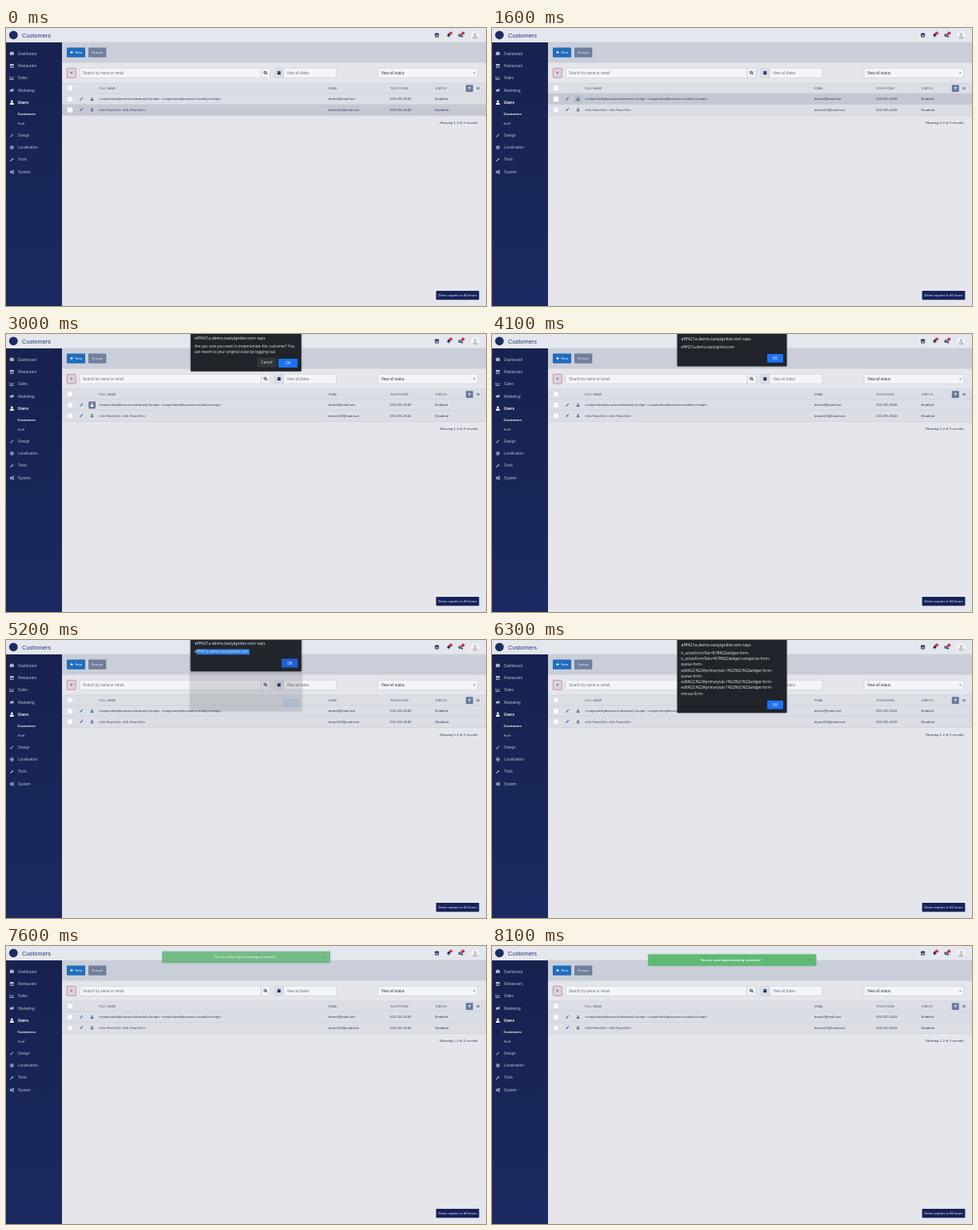
An HTML page with a canvas for the animation above (8200 ms loop, 600 by 348 pixels).

```html
<!DOCTYPE html>
<html lang="en">
<head>
<meta charset="utf-8">
<title>Customers</title>
<style>
html, body { margin: 0; width: 100%; height: 100%; overflow: hidden; background: #e4e6ec; }
canvas { display: block; width: 600px; height: 348px; }
</style>
</head>
<body>
<canvas id="stage"></canvas>
<script>
const LOOP = 8200, STEP = 100, W = 600, H = 348;
const canvas = document.getElementById('stage');
const ctx = canvas.getContext('2d');
const dpr = window.devicePixelRatio || 1;
canvas.width = W * dpr;
canvas.height = H * dpr;

const SANS = '"Liberation Sans", Arial, sans-serif';
const NOTO = '"Noto Sans", "Open Sans", sans-serif';
const NAVY = '#1b2858', INK = '#2b3350', MUTED = '#6d7486';

// Icons on a 16 unit grid
const ICONS = {
  gauge: 'M2 14A8 8 0 1 1 14 14ZM7 11L11 5 9.5 12Z',
  store: 'M2 1H14L16 7H0ZM1.5 8H14.5V15H1.5ZM4 9V12H12V9Z',
  chart: 'M0 1H2V13H16V15H0ZM4 9L7 5 10 8 15 3V6L10 11 7 8 4 12Z',
  horn: 'M1 5H6L14 1V13L6 10H5L6 15H3L2 10H1Z',
  user: 'M8 0A4 4 0 1 1 8 8A4 4 0 1 1 8 0ZM1 16V13Q1 9 5 9H11Q15 9 15 13V16Z',
  brush: 'M15 1L9 10 6 8ZM5 9L8 11Q7 15 1 15Q3 13 3 11Z',
  globe: 'M8 1A7 7 0 1 1 8 15A7 7 0 1 1 8 1ZM7 3V7H3Q4 4 7 3ZM9 3V7H13Q12 4 9 3ZM7 13V9H3Q4 12 7 13ZM9 13V9H13Q12 12 9 13Z',
  wrench: 'M1 13L8 6Q7 1 12 1L10 4 12 6 15 4Q15 9 10 8L3 15Z',
  cogs: 'M5.5 3A5 5 0 1 1 5.5 13A5 5 0 1 1 5.5 3ZM5.5 6A2 2 0 1 0 5.5 10A2 2 0 1 0 5.5 6ZM13 1A3 3 0 1 1 13 7A3 3 0 1 1 13 1ZM13 9A3 3 0 1 1 13 15A3 3 0 1 1 13 9Z',
  bell: 'M8 0Q13 2 13 8L15 12H1L3 8Q3 2 8 0ZM6 13H10Q10 16 8 16Q6 16 6 13Z',
  search: 'M6.5 0A6.5 6.5 0 1 1 6.5 13A6.5 6.5 0 1 1 6.5 0ZM6.5 3A3.5 3.5 0 1 0 6.5 10A3.5 3.5 0 1 0 6.5 3ZM10 12L12 10 16 14 14 16Z',
  calendar: 'M1 2H4V0H6V2H10V0H12V2H15V5H1ZM1 6H15V16H1Z',
  pencil: 'M1 15L2 11 10 3 13 6 5 14ZM11 2L13 0 16 3 14 5Z',
  filter: 'M1 1H15L10 8V15L6 12V8Z',
  plus: 'M6 1H10V6H15V10H10V15H6V10H1V6H6Z',
  cross: 'M3 1L8 6 13 1 15 3 10 8 15 13 13 15 8 10 3 15 1 13 6 8 1 3Z',
  caret: 'M1 5H15L8 13Z',
  list: 'M0 2H16V4H0ZM0 7H16V9H0ZM0 12H16V14H0Z'
};
for (const k in ICONS) ICONS[k] = new Path2D(ICONS[k]);

function icon(name, x, y, size, color) {
  ctx.save();
  ctx.translate(x - size / 2, y - size / 2);
  ctx.scale(size / 16, size / 16);
  ctx.fillStyle = color;
  ctx.fill(ICONS[name], 'evenodd');
  ctx.restore();
}

// Text is set ten times larger and scaled down for exact advances
function text(str, x, y, size, color, o = {}) {
  ctx.save();
  ctx.translate(x, y + size * 0.34);
  ctx.scale(0.1, 0.1);
  ctx.font = (o.bold ? 'bold ' : '') + size * 10 + 'px ' + (o.font || SANS);
  ctx.textAlign = o.align || 'left';
  ctx.fillStyle = color;
  ctx.fillText(str, 0, 0);
  ctx.restore();
}

function box(x, y, w, h, fill, r = 0, stroke) {
  ctx.beginPath();
  ctx.roundRect(x, y, w, h, r);
  ctx.fillStyle = fill;
  ctx.fill();
  if (stroke) {
    ctx.strokeStyle = stroke;
    ctx.lineWidth = 0.6;
    ctx.stroke();
  }
}

function disc(x, y, r, fill) {
  ctx.beginPath();
  ctx.arc(x, y, r, 0, 7);
  ctx.fillStyle = fill;
  ctx.fill();
}

// Linear interpolation through [time, value, ...] keys
function track(keys, t) {
  if (t <= keys[0][0]) return keys[0].slice(1);
  for (let i = 1; i < keys.length; i++) {
    const a = keys[i - 1], b = keys[i];
    if (t <= b[0]) {
      const p = (t - a[0]) / (b[0] - a[0]);
      return a.slice(1).map((v, j) => v + (b[j + 1] - v) * p);
    }
  }
  return keys[keys.length - 1].slice(1);
}

const MENU = [
  ['gauge', 'Dashboard', 32], ['store', 'Restaurant', 47.4], ['chart', 'Sales', 62.6],
  ['horn', 'Marketing', 78], ['user', 'Users', 93.2], ['brush', 'Design', 134.2],
  ['globe', 'Localisation', 149.6], ['wrench', 'Tools', 164.9], ['cogs', 'System', 180.2]
];

function sidebar() {
  const g = ctx.createLinearGradient(0, 18, 0, H);
  g.addColorStop(0, '#17224f');
  g.addColorStop(1, '#1a2960');
  box(0, 18, 70, H - 18, g);
  for (const [name, label, y] of MENU) {
    const on = label === 'Users';
    const color = on ? '#ffffff' : '#b9c0d4';
    icon(name, 7.3, y, 5.4, color);
    text(label, 15, y, 4.7, color, { bold: on });
  }
  text('Customers', 14.5, 107.2, 4.3, '#ffffff', { bold: true });
  text('Staff', 14.5, 120, 4.3, '#b9c0d4');
}

function header() {
  box(0, 0, W, 18, '#e5e7ee');
  box(70, 17.7, 530, 0.6, '#b9bdca');
  disc(9.3, 8.8, 5.4, '#1d2b63');
  text('Customers', 20, 9.2, 7.45, '#24356f');
  icon('store', 538.6, 9, 5.6, NAVY);
  icon('bell', 553.4, 9, 5.2, NAVY);
  icon('cogs', 568.2, 9, 6, NAVY);
  disc(556, 6.5, 2.1, '#d8363e');
  disc(571.3, 6.5, 2.1, '#d8363e');
  disc(586.4, 9.2, 5, '#f6f5f7');
  ctx.save();
  ctx.beginPath();
  ctx.arc(586.4, 9.2, 4.8, 0, 7);
  ctx.clip();
  disc(586.4, 8, 2, '#c9c3c8');
  disc(586.4, 14, 4, '#c9c3c8');
  ctx.restore();
}

function toolbar() {
  box(70, 18.2, 530, 25.3, '#caced8');
  box(76, 24.5, 23, 12.3, '#1f6dbd', 0.8);
  icon('plus', 82, 30.5, 4, '#ffffff');
  text('New', 86.5, 30.5, 4.28, '#ffffff');
  box(103, 24.5, 22.3, 12.3, '#717f9d', 0.8);
  text('Groups', 107, 30.5, 4.28, '#eef0f5');
}

function filters() {
  const edge = '#c6cad5';
  box(76.4, 50.4, 10.8, 11.8, '#d4d8e2', 0.8, '#d4555d');
  icon('cross', 81.8, 56, 3.2, '#d42f3a');
  box(92.3, 50.3, 226.5, 12, '#f4f5f8', 0.8, edge);
  text('Search by name or email', 96, 56.3, 4.6, MUTED);
  box(318.8, 50.3, 11.4, 12, '#f1f2f6', 0.8, edge);
  icon('search', 324.4, 56, 4.6, NAVY);
  box(336, 50.3, 11, 12, '#dcdfe7', 0.8, edge);
  icon('calendar', 341.3, 56, 4.6, NAVY);
  box(347, 50.3, 66, 12, '#f4f5f8', 0.8, edge);
  text('View all dates', 351, 56.3, 4.55, MUTED);
  box(465, 50.3, 124.7, 12, '#f4f5f8', 0.8, edge);
  text('View all status', 469, 56, 4.55, INK);
  icon('caret', 585.3, 56.3, 2.6, NAVY);
}

const ROWS = [
  ['<script>alert(document.domain)<\/script> <script>alert(document.cookie)<\/script>',
    'demo2@mail.test', '555-555-0142', 'Enabled', 82, 89],
  ['<h1>Test</h1> <h1>Test</h1>', 'demo123@mail.test', '555-555-0142', 'Disabled', 96, 102.4]
];

function checkbox(y) {
  box(76.6, y - 3.4, 6.8, 6.8, '#fafafc', 0.8, '#c9cdd8');
}

function table(hover, press) {
  box(70, 69, 530, 13, '#dcdee6');
  checkbox(75.2);
  [['FULL NAME', 116], ['EMAIL', 403], ['TELEPHONE', 480], ['STATUS', 536.5]]
    .forEach(([s, x]) => text(s, x, 75.6, 3.8, '#555d72'));
  box(574.8, 71.2, 9, 8.8, '#6a7b9e', 0.8);
  icon('filter', 579.3, 75.6, 3.8, '#ffffff');
  icon('list', 590, 75.4, 3.8, '#4b556f');

  ROWS.forEach(([name, mail, phone, status, top, y], i) => {
    box(70, top, 530, 13.6, '#dcdee6');
    ctx.globalAlpha = hover[i];
    box(70, top, 530, 13.6, '#c4c8d3');
    ctx.globalAlpha = 1;
    checkbox(y);
    icon('pencil', 94.2, y - 0.2, 4.4, '#1f6dbd');
    if (i === 0 && press > 0) {
      ctx.globalAlpha = press;
      box(103.2, y - 4.6, 8.8, 9, '#687a9f', 0.8);
      ctx.globalAlpha = 1;
    }
    icon('user', 107.5, y - 0.2, 4.2, i === 0 && press > 0.5 ? '#ffffff' : '#5c6b8f');
    text(name, 116, y, 4.28, INK);
    text(mail, 403, y, 4.28, INK);
    text(phone, 480, y, 4.28, INK);
    text(status, 536.5, y, 4.28, INK);
  });
  [69, 82, 95.8, 109.4].forEach(y => box(70, y - 0.25, 530, 0.5, '#c3c7d1'));
  text('Showing 1-2 of 2 records', 542, 118.8, 4.28, INK);
}

function badge() {
  box(537.6, 329, 53.8, 11.2, '#17225a', 0.8);
  text('Demo expires in 46 hours', 564.5, 334.8, 4.22, '#f1f3f8', { align: 'center' });
}

const SITE = 'efff421a.demo.tastyigniter.com';
const DIALOGS = [
  {
    lines: ['Are you sure you want to impersonate this customer? You',
      'can revert to your original state by logging out.'],
    cancel: true,
    keys: [[2100, 0, 1], [2200, 0.35, 0.6], [2300, 0.9, 0.2], [2400, 1, 0],
      [2900, 1, 0], [3000, 1, 0.35], [3100, 0.35, 1], [3200, 0, 1]]
  },
  {
    lines: [SITE],
    select: true,
    keys: [[3500, 0, 1], [3600, 0.35, 0.6], [3700, 0.9, 0.2], [3800, 1, 0],
      [5100, 1, 0], [5200, 0.98, 0.4], [5300, 0.35, 1], [5400, 0, 1]]
  },
  {
    lines: ['ti_activeFormTab=%7B%22widget-form-',
      'ti_activeFormTabs=%7B%22widget-categories-form-',
      'queue-form-',
      'edit%22:%22#primarytab-1%22%2C%22widget-form-',
      'queue-form-',
      'edit%22:%22#primarytab-1%22%2C%22widget-form-',
      'edit%22:%22#primarytab-1%22%2C%22widget-form-',
      'menus-form-'],
    keys: [[5100, 0, 1], [5200, 0.1, 1], [5300, 0.5, 0.5], [5400, 0.9, 0.2], [5500, 1, 0],
      [6700, 1, 0], [6800, 0.95, 0.4], [6900, 0.38, 1], [7000, 0, 1]]
  }
];

function dialog(d, t) {
  const [alpha, away] = track(d.keys, t);
  if (alpha <= 0) return;
  const zoom = 1 + 0.029 * away;
  const last = 16.4 + 7.25 * (d.lines.length - 1);
  const by = last + 14;
  ctx.save();
  ctx.globalAlpha = alpha;
  ctx.translate(300, -4.5 * away);
  ctx.scale(zoom, zoom);
  ctx.translate(-300, 0);
  ctx.save();
  ctx.shadowColor = 'rgba(0,0,0,.35)';
  ctx.shadowBlur = 2 * dpr;
  box(231.5, -12, 137, last + 36.2, '#202329', 1);
  ctx.restore();
  text(SITE + ' says', 236.5, 6.4, 5.16, '#e8eaed', { font: NOTO });

  if (d.select && t > 4100) {
    const left = track([[4100, 304.3], [4500, 238.7]], t)[0];
    box(left, 13.2, 304.3 - left, 6.5, '#2f7fe6');
  }
  d.lines.forEach((s, i) => text(s, 236.3, 16.4 + 7.25 * i, 4.57, '#dfe1e5', { font: NOTO }));

  if (d.cancel) {
    box(314.2, by - 6, 22.8, 10.6, '#30343b', 1, '#444951');
    text('Cancel', 325.6, by - 0.5, 4.5, '#dfe1e5', { font: NOTO, align: 'center' });
  }
  const x = d.cancel ? 340 : 344;
  const dim = d.select && t > 4100;
  box(x, by - 5.4, 364 - x, 10.8, dim ? '#1f64d8' : '#1a73f4', 1);
  text('OK', (x + 364) / 2, by, 4.5, '#ffffff', { font: NOTO, align: 'center' });
  ctx.restore();
}

function flash(t) {
  if (t < 7400) return;
  const p = Math.min(1, (t - 7300) / 800);
  const ease = 1 - Math.pow(1 - p, 3);
  ctx.save();
  ctx.globalAlpha = ease;
  ctx.translate(0, -15 * (1 - ease));
  ctx.save();
  ctx.shadowColor = 'rgba(40,60,60,.3)';
  ctx.shadowBlur = 2 * dpr;
  box(195, 10.4, 210.3, 14.4, '#5fbb73', 1);
  ctx.restore();
  text('You are now impersonating customer!', 298.6, 17.5, 4.22, '#f4fbf5', { bold: true, align: 'center' });
  icon('cross', 397, 17.5, 2.2, '#24502f');
  ctx.restore();
}

function draw(t) {
  ctx.setTransform(dpr, 0, 0, dpr, 0, 0);
  box(0, 0, W, H, '#e4e6ec');
  header();
  toolbar();
  filters();
  const graze = track([[6700, 0], [6800, 0.3], [6900, 0.5], [7000, 0]], t)[0];
  const hover = [t >= 1600 && t < 2800 ? 1 : graze, t < 1600 ? 1 : 0];
  const press = track([[1500, 0], [1600, 0.15], [1700, 0.6], [1800, 1], [3000, 1], [3200, 0]], t)[0];
  table(hover, press);
  badge();
  sidebar();
  for (let i = DIALOGS.length - 1; i >= 0; i--) dialog(DIALOGS[i], t);
  flash(t);
}

const start = performance.now();
function frame(now) {
  const t = Math.max(0, now - start) % LOOP;
  draw(Math.floor(t / STEP) * STEP);
  requestAnimationFrame(frame);
}
draw(0);
requestAnimationFrame(frame);
</script>
</body>
</html>
```
